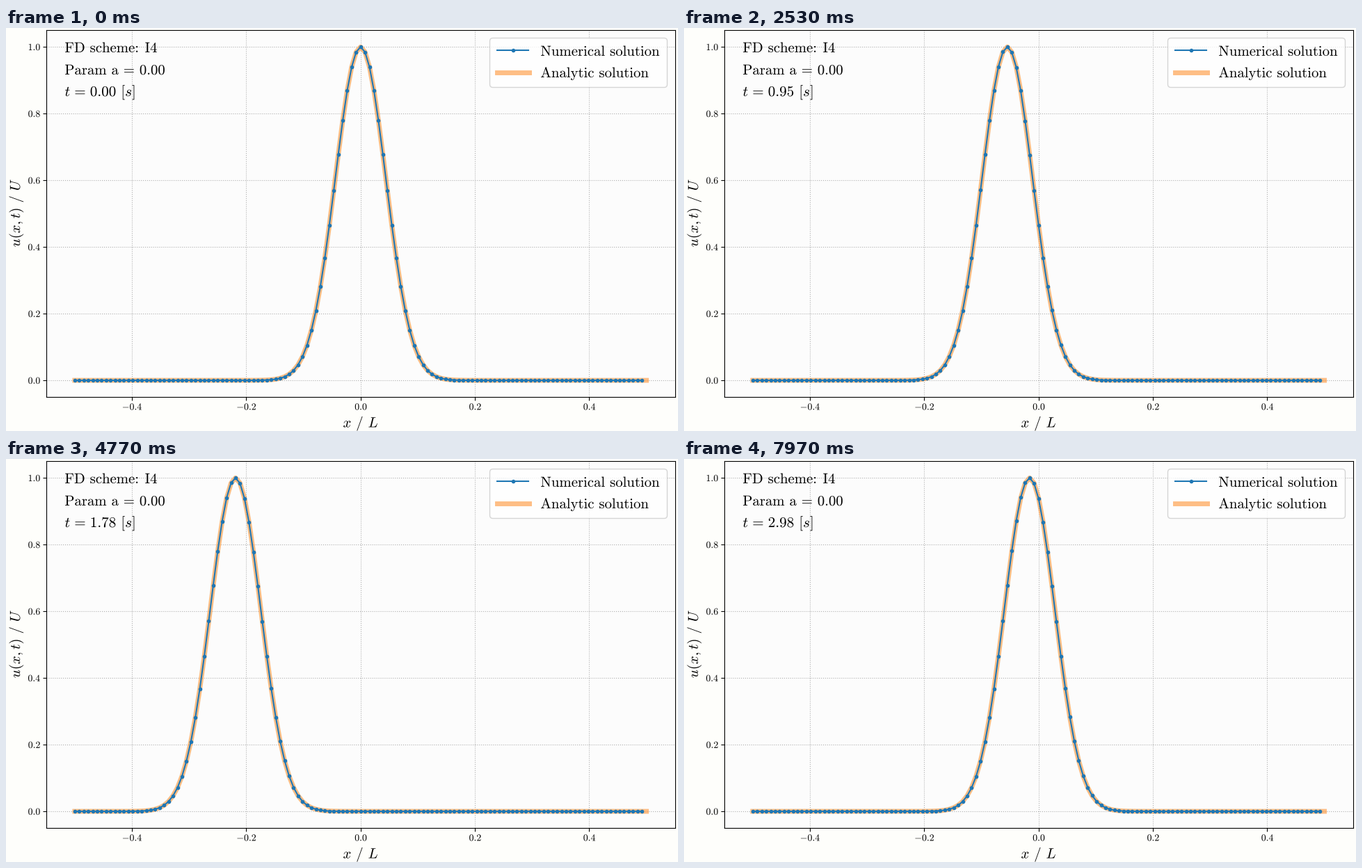
Recreate the animation shown at these times as a matplotlib script. Size 966x580 px, loop 8000 ms.

```python
import numpy as np
import matplotlib.pyplot as plt
from matplotlib.animation import FuncAnimation
from matplotlib.patches import FancyBboxPatch, PathPatch
from matplotlib.path import Path
from matplotlib.textpath import TextPath
from matplotlib.transforms import Affine2D

W, H, DPI = 966, 580, 100
TICK_MS, LOOP_MS = 20, 8000
N = 128
BLUE, ORANGE = "#1f77b4", "#ff7f0e"
PAPER, PANEL = "#fefefb", "#fcfcfc"
BIG, SMALL = 20.75, 13.84          # em sizes in pixels
SP = r"\hspace{0.38}"              # word space

plt.rcParams["mathtext.fontset"] = "cm"

fig = plt.figure(figsize=(W / DPI, H / DPI), dpi=DPI, facecolor=PAPER)
left, right, top, bottom = 57.8, 961.6, 3.2, 531.1
ax = fig.add_axes([left / W, 1 - bottom / H, (right - left) / W, (bottom - top) / H],
                  facecolor=PANEL)
xticks = np.arange(-2, 3) * 0.2
yticks = np.arange(6) * 0.2
ax.set_xticks(xticks)
ax.set_yticks(yticks)
ax.tick_params(labelbottom=False, labelleft=False)
ax.grid(True, color="#b0b0b0", ls=":", lw=0.8)
ax.set_axisbelow(True)

# pixel coordinates with the origin at the top left
pixels = Affine2D().scale(1, -1).translate(0, H)


def words(s, x, y, em=BIG, ha="left", turn=0):
    """Outline of s with its ink aligned to x and its baseline on y."""
    path = TextPath((0, 0), f"${s}$", size=em)
    box = path.get_extents()
    anchor = {"left": box.x0, "center": (box.x0 + box.x1) / 2, "right": box.x1}[ha]
    move = Affine2D().translate(-anchor, 0).rotate_deg(turn).translate(x, H - y)
    return move.transform_path(path)


def ink(path):
    patch = PathPatch(path, fc="black", lw=0, clip_on=False, zorder=6)
    ax.add_patch(patch)
    patch.set_transform(Affine2D())
    return patch


def clock(t):
    return words(rf"t\hspace{{0.13}}=\hspace{{0.13}}{t:.2f}{SP}[s]", 85, 98, 21.1)


labels = [
    words(rf"x{SP}/{SP}L", 509.5, 574.5, ha="center"),
    words(rf"u(x,t){SP}/{SP}U", 20, 266.5, ha="center", turn=90),
    words(rf"\mathrm{{FD{SP}scheme\hspace{{-0.2}}:\hspace{{0.27}}I4}}", 85, 35),
    words(rf"\mathrm{{Param{SP}a\hspace{{0.18}}=\hspace{{0.18}}0.00}}", 85, 67),
    words(rf"\mathrm{{Numerical{SP}solution}}", 769, 40),
    words(rf"\mathrm{{Analytic{SP}solution}}", 769, 71),
]
for v in xticks:
    px = left + (v + 0.55) / 1.1 * (right - left)
    labels.append(words(f"{v:.1f}", px + 0.3, 549.5, SMALL, ha="center"))
for v in yticks:
    py = bottom - (v + 0.05) / 1.1 * (bottom - top)
    labels.append(words(f"{v:.1f}", 48.7, py + 4.8, SMALL, ha="right"))
ink(Path.make_compound_path(*labels))
time_note = ink(clock(0))

# curves
band, = ax.plot([], [], color=ORANGE, alpha=0.5, lw=5, zorder=2)
dots, = ax.plot([], [], color=BLUE, lw=1.5, marker=".", ms=6, zorder=2.1)

# legend
box = FancyBboxPatch((695.5, 14.5), 255, 71, boxstyle="round,pad=0,rounding_size=4.4",
                     fc=(1, 1, 1, 0.8), ec=(0.8, 0.8, 0.8, 0.8), lw=1, zorder=5)
ax.add_patch(box)
box.set_transform(pixels)
key = dict(transform=pixels, zorder=5.5)
ax.plot([706.3, 728.5, 750.7], [32.3] * 3, color=BLUE, lw=1.5, marker=".", ms=6,
        markevery=[1], **key)
ax.plot([706.3, 751.5], [63.5] * 2, color=ORANGE, alpha=0.5, lw=5, **key)
ax.set_xlim(-0.55, 0.55)
ax.set_ylim(-0.05, 1.05)


def pulse(x, t):
    d = (x - t + 0.5) % 1 - 0.5
    return np.exp(-256 * d ** 2)


x_num = np.arange(N) / N - 0.5
x_ana = np.linspace(-0.5, 0.5, N + 1)

# modified wavenumber of the implicit fourth-order scheme
kh = 2 * np.pi * np.arange(N // 2 + 1) / N
k_mod = 3 * np.sin(kh) / (2 + np.cos(kh)) * N
start = np.fft.rfft(pulse(x_num, 0))


def draw(i):
    step = (3 * i + 2) // 5        # 30 pictures a second on a 20 ms clock
    t = (8 * step // 5) / N
    band.set_data(x_ana, pulse(x_ana, t))
    dots.set_data(x_num, np.fft.irfft(start * np.exp(-1j * k_mod * t), N))
    time_note.set_path(clock(t))
    return band, dots, time_note


anim = FuncAnimation(fig, draw, frames=LOOP_MS // TICK_MS, interval=TICK_MS,
                     repeat=True, repeat_delay=0, blit=False)
plt.show()
```
